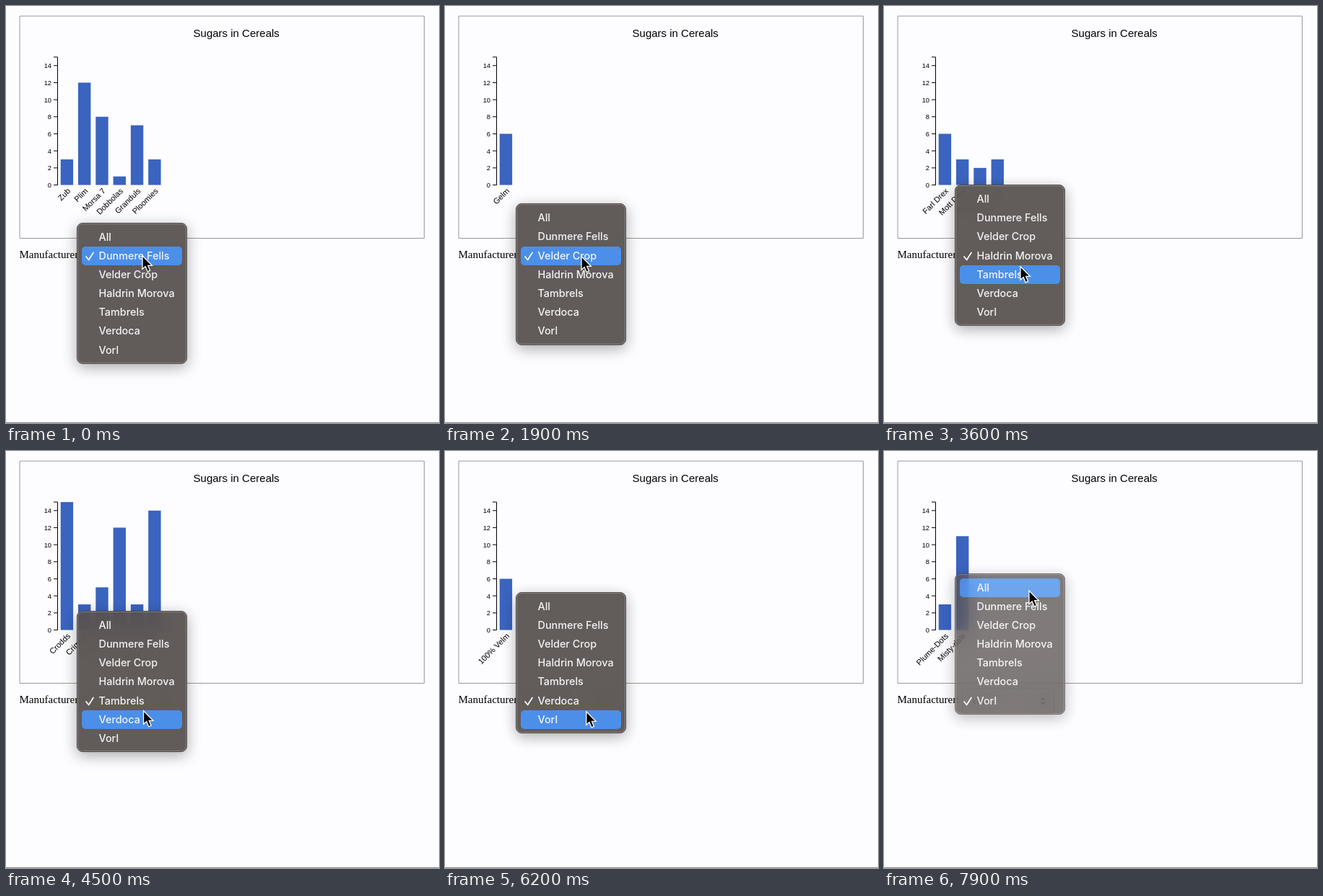
Write an HTML page that moves like this. It is 600 px wide and 579 px high and loops after 8000 ms.

```html
<!DOCTYPE html>
<html lang="en">
<head>
<meta charset="utf-8">
<title>Sugars in Cereals</title>
<style>
html, body { margin: 0; width: 100%; height: 100%; overflow: hidden; background: #fdfcff; }
svg { position: absolute; left: 0; top: 0; }
#stage { position: relative; width: 600px; height: 579px; overflow: hidden; }
#plot { font-family: "Liberation Sans", Arial, sans-serif; }
.serif { font: 15px "Liberation Serif", Times, serif; }
#menu {
  position: absolute; left: 98px; width: 153px; height: 196.4px; box-sizing: border-box;
  padding: 6px; border: 1px solid #4a4644; border-radius: 8px;
  background: rgba(85, 79, 77, .93); backdrop-filter: blur(12px);
  box-shadow: inset 0 0 0 1px rgba(255, 255, 255, .25), 0 5px 20px rgba(0, 0, 0, .33);
  font: 500 14.4px/26.2px Inter, sans-serif; color: #f5f3f3;
}
#menu div { position: relative; height: 26.2px; padding-left: 23.5px; border-radius: 5px; white-space: nowrap; }
#menu .on { background: #4b8fe9; }
#menu path { fill: none; stroke: #fff; stroke-width: 1.7; stroke-linecap: round; stroke-linejoin: round; }
</style>
</head>
<body>
<div id="stage">
  <svg id="plot" width="600" height="579">
    <path d="M19 14H579.5V322.5H19Z" fill="none" stroke="#999"/>
    <path d="M0 578.5H600" stroke="#8a8a8a"/>
    <text x="319.2" y="43" font-size="15" text-anchor="middle">Sugars in Cereals</text>
    <g id="axis" font-size="9.3" text-anchor="end"></g>
    <g id="bars" font-size="11" text-anchor="end"></g>
    <text class="serif" x="18.5" y="350">Manufacturer:</text>
    <rect x="108.5" y="329.5" width="127" height="34.5" rx="3" fill="#fbfafc" stroke="#a5a5a7"/>
    <text id="choice" class="serif" x="120" y="352" fill="#333"></text>
    <path d="M216.3 345.6L220.3 341.6L224.3 345.6ZM216.3 348.4L220.3 352.4L224.3 348.4Z" fill="#333"/>
  </svg>
  <div id="menu"></div>
  <svg id="cursor" width="20" height="30" viewBox="-2 -2 20 30">
    <path d="M0 0V18.5L4.2 14.8L7.2 22L10.6 20.5L7.7 13.6H13.4Z" stroke="#fff" stroke-width="1.3"/>
  </svg>
</div>
<script>
const LOOP = 8000, ROW = 26.2, HOME = 346.8, FADE = 210, LAG = 300;
const $ = id => document.getElementById(id);
const clamp = v => Math.min(1, Math.max(0, v));
const ease = v => (v = clamp(v), v * v * (3 - 2 * v));
const mix = (a, b, k) => a + (b - a) * ease(k);
const yOf = v => 248.5 - v * 11.84;

const makers = [
  ["All", ""],
  ["Dunmere Fells", "Zub 3,Plim 12,Morsa 7 8,Dobbolas 1,Granduls 7,Ploomies 3"],
  ["Velder Crop", "Gelm 6"],
  ["Haldrin Morova", "Farl Drex 6,Mott Drex 3,Rilo Drex 2,Sund Drex 3"],
  ["Tambrels", "Crodds 15,Crimbol 3,Om-Brel 5,Durl Tops 12,Morvet 8 3,Appel Zans 14"],
  ["Verdoca", "100% Velm 6"],
  ["Vorl", "Plume-Dots 3,Misty-dale 11"]
];

// When the list opens and closes, for each selected maker in turn
const opens = [0, 1700, 3150, 4250, 5500, 6800];
const closes = [900, 2376, 3600, 4600, 6200, 7860];

const selectedAt = t => 1 + closes.filter(c => t >= c + LAG).length;

// Each turn: return to the button, open the list, glide to the next row
function pointerY(t, sel) {
  const open = opens[sel - 1], close = closes[sel - 1], below = HOME + 15;
  if (t < open) return mix(below, HOME, (t - open + 300) / 200);
  const start = Math.max(open, close - 550), last = sel === makers.length - 1;
  return mix(HOME, last ? 194 : below, (t - start) / (close - 50 - start));
}

function drawAxis() {
  let s = `<path d="M66 ${yOf(15)}H71.5V248.5H66" fill="none" stroke="#000"/>`;
  for (let v = 0; v < 15; v += 2)
    s += `<path d="M66 ${yOf(v)}H71.5" stroke="#000"/><text x="63" y="${yOf(v) + 3.4}">${v}</text>`;
  $("axis").innerHTML = s;
}

function drawChart(sel) {
  const [maker, list] = makers[sel];
  $("choice").textContent = maker;
  $("bars").innerHTML = list.split(",").map((entry, i) => {
    const cut = entry.lastIndexOf(" "), v = +entry.slice(cut + 1), x = 75.7 + i * 24.3;
    return `<rect x="${x}" y="${yOf(v)}" width="17.4" height="${248.5 - yOf(v)}" fill="#3a64bf"/>
      <text transform="translate(${x + 14.2} 257.5) rotate(-45)">${entry.slice(0, cut)}</text>`;
  }).join("");
}

const tick = `<svg width="18" height="26"><path d="M6 14L9.6 18.5L16 8.5"/></svg>`;
$("menu").innerHTML = makers.map(m => `<div>${tick}${m[0]}</div>`).join("");
const rows = [...$("menu").children];
let shown = 0;

function draw(t) {
  const sel = selectedAt(t), open = opens[sel - 1], close = closes[sel - 1];
  if (sel !== shown) drawChart(shown = sel);

  const y = pointerY(t, sel), hover = Math.round(sel + (y - HOME) / ROW);
  const alpha = t < open ? 0 : clamp(1 - (t - close) / FADE);
  const style = $("menu").style;
  style.visibility = alpha ? "visible" : "hidden";
  style.opacity = alpha;
  style.top = HOME - (sel + .5) * ROW - 7 + "px";
  rows.forEach((row, i) => {
    row.className = i === hover ? "on" : "";
    row.firstChild.style.display = i === sel ? "" : "none";
  });

  const x = 189 + 12 * clamp((t - 4000) / 3900);
  $("cursor").style.transform = `translate(${x - 2}px, ${y - 2}px)`;
}

function frame() {
  draw(performance.now() % LOOP);
  requestAnimationFrame(frame);
}
drawAxis();
frame();
</script>
</body>
</html>
```
